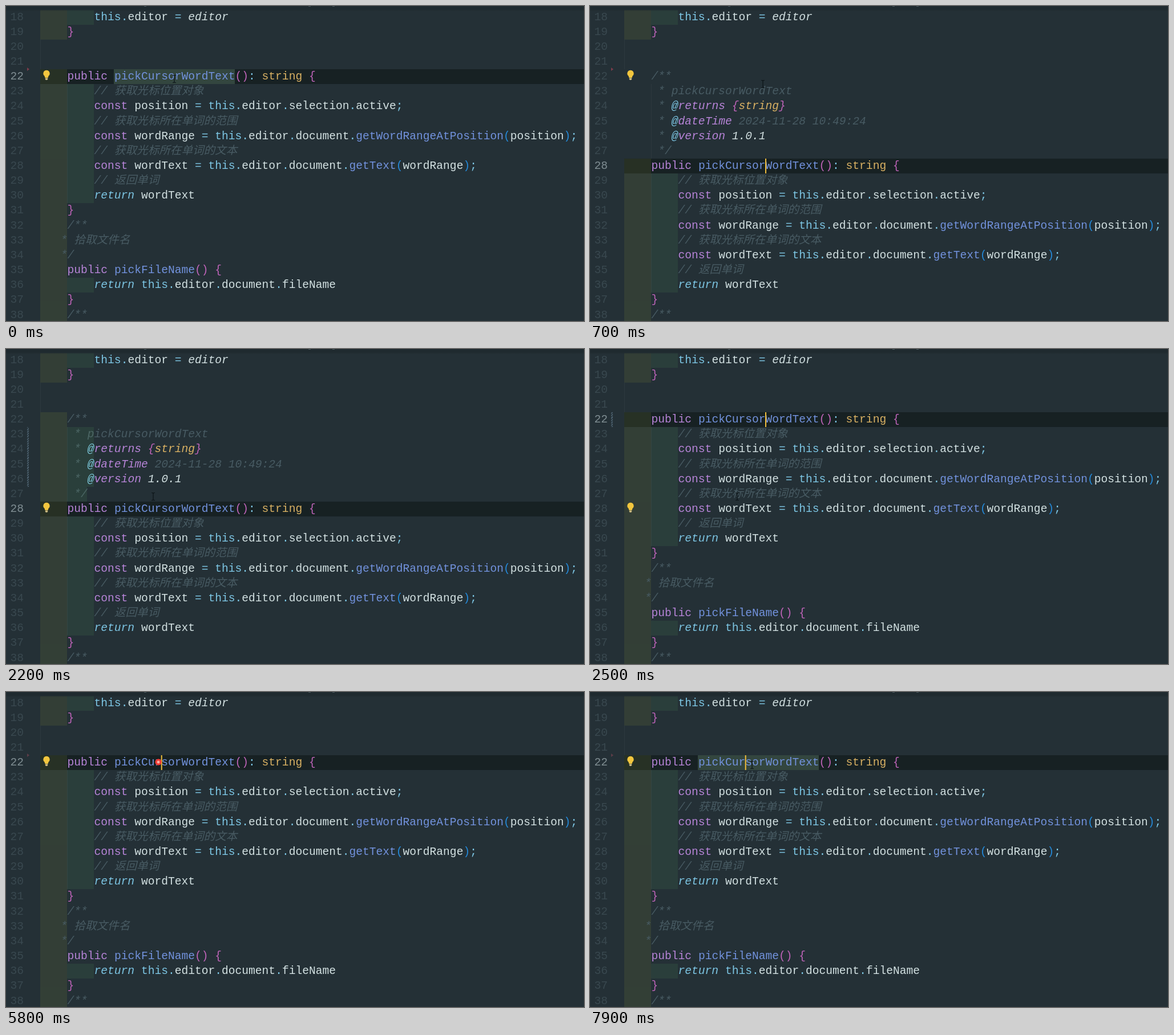
Animation of 1013x553 px, one loop 8 s. Source, as an HTML page:

```html
<!DOCTYPE html>
<html lang="zh-CN">
<head>
<meta charset="utf-8">
<title>Editor</title>
<style>
  html, body { margin: 0; width: 100%; height: 100%; overflow: hidden; background: #243036; }
  #stage {
    --row: 26.15px; --ch: 11.762px;
    position: absolute; inset: 0; overflow: hidden; background: #243036; color: #d3e1e2;
    font: 19.6px/26.15px "Liberation Mono", "Noto Sans CJK SC", "Noto Sans CJK", monospace;
  }
  #stage div, #stage svg { position: absolute; }
  .line, .num, .box { top: calc(6.5px + (var(--n) - 18) * var(--row)); }
  .line, .num { white-space: pre; height: var(--row); }
  .line { left: 60.5px; }
  .num { left: 7.5px; color: #39484f; }
  .num.on { color: #7f8d92; }
  .box {
    left: calc(60px + var(--x) * var(--ch)); width: calc(var(--w) * var(--ch));
    height: calc(var(--h) * var(--row));
  }
  .olive { background: rgba(255, 255, 64, .07); }
  .green { background: rgba(127, 255, 127, .07); }
  .guide { width: 1px; background: rgba(255, 255, 255, .045); }
  .row { background: #172123; right: 0; width: auto; }
  .word { background: #33463f; }
  .stripe {
    left: 37px; width: 3px;
    background: repeating-linear-gradient(-45deg, #4c5f6d 0 1.5px, #2b3a42 1.5px 3px);
  }

  .kw, .tag { color: #b784d8; }
  .ret, .at, .op, .self { color: #7dc6e4; }
  .fn { color: #7292dd; }
  .type { color: #d9b163; }
  .br { color: #c064ba; }
  .blue { color: #248bdc; }
  .cm { color: #485b63; }
  .cm, .tag, .ret, .it, .doc { font-style: italic; }

  #top { left: 0; right: 0; top: 0; height: 9px; background: linear-gradient(#1f2a2f 60%, transparent); }
  #top div { top: 0; height: 1px; width: 4px; background: #4b595e; }
  #mark { left: 37px; top: 108px; border: solid transparent; border-width: 3.5px 0 3.5px 4px; border-left-color: #7d3c4b; }
  #caret { left: 307.3px; top: 111px; width: 2px; height: 26px; background: #f0bd3c; }
  #bulb { left: 64px; top: 112px; }
  #mouse { left: -8px; top: -10px; }
  #click {
    left: 261px; top: 117px; width: 12px; height: 12px; border-radius: 50%; opacity: 0;
    background: radial-gradient(#ffb9ad 0 16%, #ee3a33 38% 62%, rgba(238, 58, 51, 0) 72%);
  }

  #stage .anim { animation: 8s step-end infinite; }
  #stage .before { animation-name: before; }
  #stage .after { animation-name: after; }
  #stage .olive.late { animation-name: lateOlive; }
  #stage .green.late { animation-name: lateGreen; }
  #stage .word { animation-name: word; }
  #stage .row { animation-name: row; }
  #stage .added { animation-name: added; }
  #stage .undone { animation-name: undone; }
  #stage #mark { animation-name: mark; }
  #stage #bulb { animation-name: bulb; }
  #stage #caret { animation-name: blink, caret; }
  #stage #mouse { animation-name: mouse; animation-timing-function: ease-in-out; }
  #stage #click { animation-name: click; animation-timing-function: linear; }

  @keyframes before { 0%, 31.2% { opacity: 1 } 8.7% { opacity: 0 } }
  @keyframes after { 0%, 31.2% { opacity: 0 } 8.7% { opacity: 1 } }
  @keyframes lateOlive { 0%, 13.7% { opacity: 1 } 8.7% { opacity: 0 } }
  @keyframes lateGreen { 0%, 31.2% { opacity: 0 } 13.7% { opacity: 1 } }
  @keyframes word { 0%, 65%, 76.2% { opacity: 1 } 8.7%, 72.4% { opacity: 0 } }
  @keyframes row { 0%, 31.2% { transform: none } 8.7% { transform: translateY(156.9px) } }
  @keyframes added { 0%, 31.2% { opacity: 0 } 17.5% { opacity: 1 } }
  @keyframes undone { 0%, 40% { opacity: 0 } 31.2% { opacity: 1 } }
  @keyframes mark {
    0% { opacity: 1 }
    17.5% { opacity: 0 }
    40%, 100% { opacity: 1; border-left-color: #5d3d48 }
  }
  @keyframes bulb { 0%, 37.5% { transform: none } 15% { transform: translateY(156.9px) } }
  @keyframes blink {
    0%, 15%, 27.4%, 37.4%, 49.9%, 62.4%, 78.7%, 90% { opacity: 0 }
    3.7%, 21.2%, 31.2%, 42.4%, 54.9%, 67.4%, 72.4%, 84.9%, 96.2% { opacity: 1 }
  }
  @keyframes caret {
    0%, 31.2% { transform: none }
    8.7% { transform: translateY(156.9px) }
    72.4%, 100% { transform: translateX(-35.3px) }
  }
  @keyframes mouse {
    0%, 3.75% { transform: translate(295px, 128px) }
    6.25%, 8.75% { transform: translate(303px, 137px) }
    18.75% { transform: translate(326px, 275px) }
    27.4%, 31.25% { transform: translate(258px, 259px) }
    41.25%, 62.5% { transform: translate(253px, 115px) }
    67.5%, 72.5% { transform: translate(267px, 123px) }
    76.25%, 100% { transform: translate(284px, 128px) }
  }
  @keyframes click {
    0%, 72.39% { opacity: 0 }
    72.4%, 74% { opacity: 1 }
    76.2%, 100% { opacity: 0 }
  }
</style>
</head>
<body>
<div id="stage"></div>
<script>
const method = [
  '    public pickCursorWordText(): string {',
  '        // 获取光标位置对象',
  '        const position = this.editor.selection.active;',
  '        // 获取光标所在单词的范围',
  '        const wordRange = this.editor.document.getWordRangeAtPosition(position);',
  '        // 获取光标所在单词的文本',
  '        const wordText = this.editor.document.getText(wordRange);',
  '        // 返回单词',
  '        return wordText',
  '    }',
  '    /**'
];
const rest = [
  '   * 拾取文件名',
  '   */',
  '    public pickFileName() {',
  '        return this.editor.document.fileName',
  '    }',
  '    /**'
];

const span = (kind, text) => `<span class="${kind}">${text}</span>`;
const tokens = new RegExp([
  '(?<cm>//.*|/\\*\\*|\\*.*)', '(?<kw>public|const)', '(?<ret>return)', '(?<self>this)',
  '(?<fn>(?:get|pick)\\w+)', '(?<type>string)', '(?<it>editor$)', '(?<br>[(){}])', '(?<op>[.=:;])'
].join('|'), 'g');

function paint(src) {
  return src.replace(tokens, (text, ...args) => {
    const groups = args.at(-1);
    const kind = Object.keys(groups).find(k => groups[k] !== undefined);
    return span(kind === 'br' && src.includes('const') ? 'blue' : kind, text);
  });
}

const tag = (name, value) =>
  '     ' + span('cm', '* ') + span('doc', span('at', '@') + span('tag', name) + ' ' + value);
const doc = [
  paint('    /**'),
  paint('     * pickCursorWordText'),
  tag('returns', span('br', '{') + span('type', 'string') + span('br', '}')),
  tag('dateTime', span('cm', '2024-11-28 10:49:24')),
  tag('version', '1.0.1'),
  paint('     */')
];

const lines = (start, list) =>
  list.map((html, i) => `<div class="line" style="--n:${start + i}">${html}</div>`).join('');
const num = (n, kind = '') => `<div class="num ${kind}" style="--n:${n}">${n}</div>`;
const box = (kind, n, h, x = 0, w = 4) =>
  `<div class="box ${kind}" style="--n:${n};--h:${h};--x:${x};--w:${w}"></div>`;
const guide = (x, y, h) => `<div class="guide" style="left:${x}px;top:${y}px;height:${h}px"></div>`;
const group = (kind, html) => `<div class="anim ${kind}" style="inset:0">${html}</div>`;

const code = method.map(paint), tail = rest.map(paint);
const numbers = Array.from({ length: 21 }, (_, i) => 18 + i);
const plain = numbers.filter(n => n !== 22 && n !== 28).map(n => num(n)).join('');

document.getElementById('stage').innerHTML =
  box('row anim', 22, 1) +
  box('word anim', 22, 1, 11, 18) +
  box('olive', 18, 2) + box('olive', 28, 11) + box('olive late anim', 22, 6) +
  box('green', 18, 1, 4) +
  guide(60, 59, 52) +
  plain +
  lines(18, [paint('        this.editor = editor'), paint('    }')]) +
  group('before',
    box('green', 23, 8, 4) + box('green', 36, 1, 4) + guide(107, 137, 209) +
    num(22, 'on') + num(28) + lines(22, [...code, ...tail])) +
  group('after',
    box('green', 29, 8, 4) + guide(107, 137, 131) + guide(107, 294, 209) +
    num(22) + num(28, 'on') + lines(22, [...doc, ...code])) +
  box('green late anim', 23, 4, 4) + box('green late anim', 27, 1, 4, 3) +
  box('stripe added anim', 23, 4) + box('stripe undone anim', 22, 1) +
  `<div id="mark" class="anim"></div>
   <svg id="bulb" class="anim" width="14" height="20">
     <path d="M7 .8a5.600 5.600 0 0 1 3.600 9.900L9.500 14h-5L3.400 10.700A5.600 5.600 0 0 1 7 .8z" fill="#f3c63e"/>
     <path d="M4.800 14.500h4.400V17q-2.200 2-4.400 0z" fill="#d0bd82"/>
   </svg>
   <div id="caret" class="anim"></div>
   <svg id="mouse" class="anim" width="16" height="20" fill="none" stroke="#0d1518" stroke-width="1.2">
     <path d="M5 3.500h2l1 1 1-1h2M8 4.500v11M5 16.500h2l1-1 1 1h2"/>
   </svg>
   <div id="click" class="anim"></div>
   <div id="top">
     <div style="left:242px"></div><div style="left:530px"></div><div style="left:572px"></div>
   </div>`;
</script>
</body>
</html>
```
